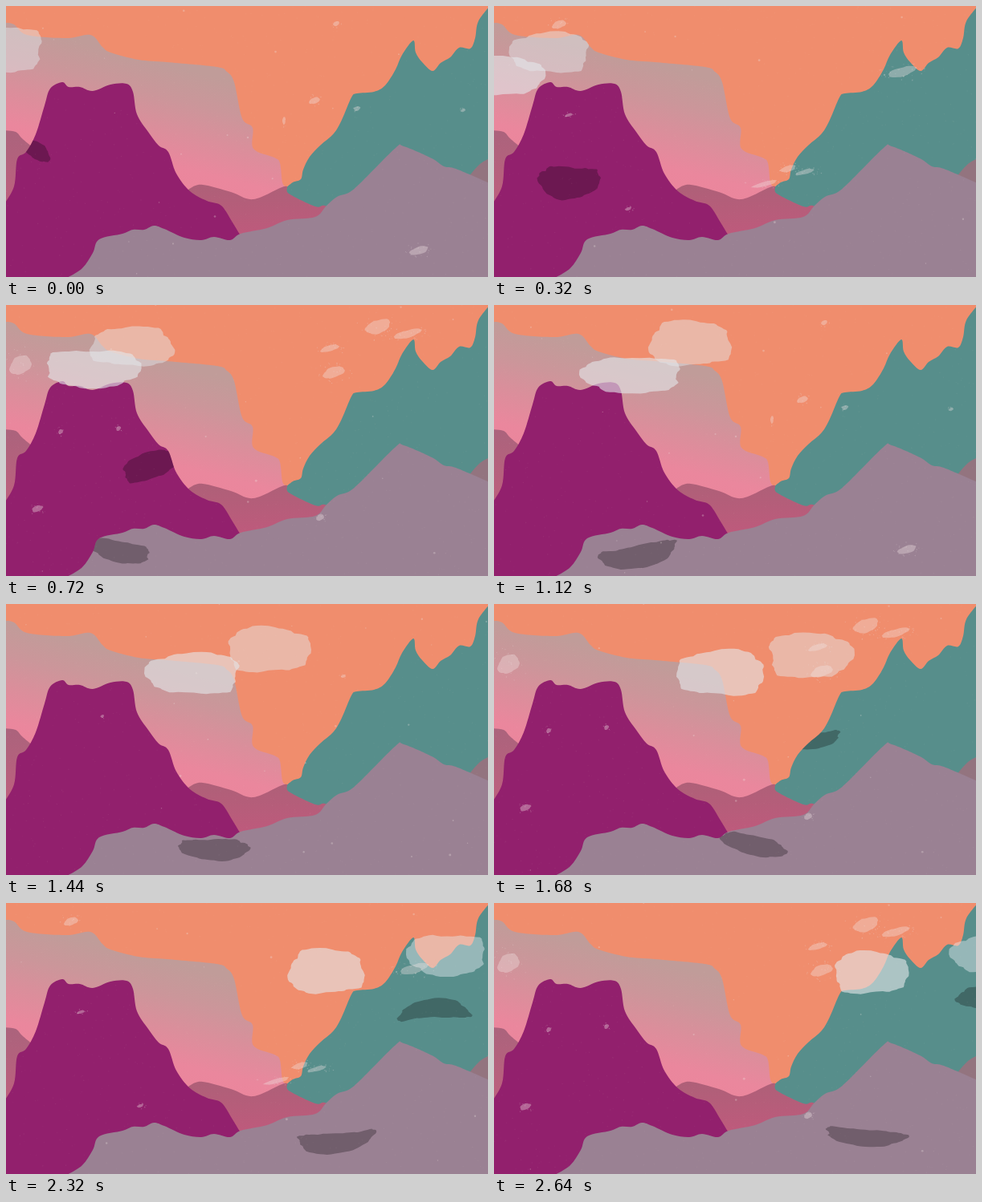
Write an HTML page with a canvas that moves like this. It is 600 by 338 pixels and loops after 2.72 s.

```html
<!DOCTYPE html>
<html lang="en">
<head>
<meta charset="utf-8">
<title>Drifting clouds</title>
<style>
html, body { margin: 0; width: 100%; height: 100%; overflow: hidden; background: #f08d6d; }
canvas { display: block; width: 600px; height: 338px; }
</style>
</head>
<body>
<canvas id="stage" width="600" height="338"></canvas>
<script>
const W = 600, H = 338, LOOP = 2720, TICK = 40, TAU = 2 * Math.PI;
const ctx = document.getElementById('stage').getContext('2d');

const parse = s => s.trim().split(/\s+/).map(p => p.split(',').map(Number));

function seeded(seed) {
  return () => {
    seed = (seed * 1664525 + 1013904223) >>> 0;
    return seed / 4294967296;
  };
}

// A smooth ridge through the points (Catmull-Rom), closed down to the bottom
function ridge(s) {
  const pts = parse(s), end = pts.length - 1, path = new Path2D();
  const at = i => pts[Math.max(0, Math.min(end, i))];
  path.moveTo(...pts[0]);
  for (let i = 0; i < end; i++) {
    const [a, b, c, d] = [at(i - 1), at(i), at(i + 1), at(i + 2)];
    path.bezierCurveTo(
      b[0] + (c[0] - a[0]) / 6, b[1] + (c[1] - a[1]) / 6,
      c[0] - (d[0] - b[0]) / 6, c[1] - (d[1] - b[1]) / 6, ...c);
  }
  path.lineTo(pts[end][0], H + 4);
  path.lineTo(pts[0][0], H + 4);
  path.closePath();
  return path;
}

const land = {
  mesa: ridge(`-4,21 10,23 26,36 75,40 105,36 120,51 130,58 165,67 200,70 262,76 275,82
    284,95 294,140 307,152 308,178 334,189 341,196 344,220 349,226`),
  leftHill: ridge('-4,155 12,157 22,167 50,190'),
  teal: ridge(`347,228 357,220 367,216 370,204 378,188 391,174 408,159 418,142 430,114 437,109 458,107
    472,99 485,79 493,61 507,43 510,58 518,70 531,81 541,71 553,64 564,52 578,53 584,40 588,19 604,-2`),
  rose: ridge('222,234 230,227 245,223 280,232 308,241 347,225 352,234 385,250 397,249 420,260'),
  rightHill: ridge('574,215 590,197 604,189'),
  purple: ridge(`-4,250 10,225 14,191 25,182 37,160 48,124 55,103 70,95 78,101 92,101 108,106 130,98 150,97
    158,107 163,135 177,157 190,174 202,182 212,209 229,231 250,243 268,249 282,270 300,300`),
  lilac: ridge(`76,339 95,327 108,308 116,291 145,284 158,279 172,279 184,274 197,278 222,289 243,292
    259,288 279,292 292,284 325,277 350,267 385,263 398,250 412,238 428,232 445,217 485,177
    495,175 530,190 545,200 560,203 604,222`)
};
const rock = new Path2D(land.purple);
rock.addPath(land.teal);

// Rows: step, x, y, half width, half height, bend, tilt
const backCloud = parse(`0,-2,54,49,29 5,70,58,50,26 12,157,52,53,25 19,244,48,52,29
  28,393,64,53,29 35,494,65,51,28 44,617,64,48,24`);
const frontCloud = parse('5,11,87,51,25 12,108,79,60,24 19,172,87,63,23 28,283,86,56,29 35,342,84,49,30 44,469,87,47,27');
const rockShadow = parse(`0,39,181,16,12,0,7 5,93,218,40,21,-10,0 12,180,200,36,18,0,-10 28,397,169,36,10,-6,-4
  35,469,148,52,11,17,-4 44,614,118,40,14,0,0`);
const valeShadow = parse(`5,49,306,41,14,-3,8 12,140,306,41,14,-3,8 19,180,311,50,15,-9,-9 28,323,300,42,13,-4,9
  35,368,301,48,15,-14,-11 44,462,291,52,11,-5,4`);

// Blend neighbouring rows; the first slope carries on backwards
function pose(rows, step) {
  let i = 0;
  while (i < rows.length - 2 && step >= rows[i + 1][0]) i++;
  const a = rows[i], b = rows[i + 1], u = (step - a[0]) / (b[0] - a[0]);
  return a.map((v, j) => v + (b[j] - v) * u).slice(1);
}

// A torn-paper blob: rounded box with slowly turning lumps and a ragged rim
function blob([x, y, rx, ry, bend = 0, tilt = 0], turn, boxy = .75, n = 72) {
  const path = new Path2D(), soft = v => Math.sign(v) * Math.abs(v) ** boxy;
  for (let i = 0; i < n; i++) {
    const a = i / n * TAU;
    const r = .96 + .05 * Math.sin(3 * a + turn) + .04 * Math.sin(5 * a - 2 * turn)
      + .025 * Math.sin(11 * a + turn) + .012 * Math.sin(23 * a);
    const u = r * soft(Math.cos(a)), v = r * soft(Math.sin(a));
    path.lineTo(x + rx * u, y + ry * v + bend * (u * u - .4) + tilt * u);
  }
  path.closePath();
  return path;
}

function sheet(draw) {
  const c = document.createElement('canvas');
  c.width = W;
  c.height = H;
  draw(c.getContext('2d'));
  return c;
}

function fill(g, path, color) {
  g.fillStyle = color;
  g.fill(path);
}

function scatter(g, rnd, n, x, y, rx, ry, size, color) {
  g.fillStyle = color;
  while (n--) {
    const a = rnd() * TAU, d = Math.sqrt(rnd());
    g.beginPath();
    g.arc(x + rx * d * Math.cos(a), y + ry * d * Math.sin(a), size * (.4 + .6 * rnd()), 0, TAU);
    g.fill();
  }
}

// Worn spots of each paper: x, y, half width, half height
const wear = [
  '411,22,4,3 384,118,7,4 346,143,2,5 437,128,4,3 569,130,3,2 514,305,12,5',
  '81,23,9,5 387,207,12,3 366,203,10,4 337,222,16,3 508,82,18,6 93,136,5,2 167,253,4,2',
  '120,140,2,2 420,90,3,2',
  '18,75,14,12 463,27,16,9 500,36,18,5 403,54,12,4 408,84,14,7 391,265,5,4 39,254,7,4 140,154,3,3 68,158,3,3'
];
const papers = wear.map((spots, i) => sheet(g => {
  const rnd = seeded(17 + i * 101);
  scatter(g, rnd, 1500, 300, 169, 400, 240, .8, 'rgba(255,235,225,.06)');
  scatter(g, rnd, 25, 300, 169, 400, 240, 1.5, 'rgba(240,228,226,.3)');
  for (const [x, y, rx, ry] of parse(spots)) {
    fill(g, blob([x, y, rx, ry, 0, -rx / 4], rnd() * TAU, 1, 30), 'rgba(240,228,226,.36)');
    scatter(g, rnd, rx * 2, x, y, rx * 1.8, ry * 2, .8, 'rgba(240,228,226,.25)');
  }
}));

function gradient(x0, y0, x1, y1, ...stops) {
  const g = ctx.createLinearGradient(x0, y0, x1, y1);
  stops.forEach((c, i) => g.addColorStop(i / (stops.length - 1), c));
  return g;
}

const backdrop = sheet(g => {
  g.fillStyle = '#f08d6d';
  g.fillRect(0, 0, W, H);
  fill(g, land.mesa, gradient(150, 60, 110, 215, '#c09c99', '#cb969a', '#db8e9b', '#ea879d', '#ec859c'));
  fill(g, land.leftHill, gradient(0, 155, 0, 245, '#ab637c', '#bd607e'));
  fill(g, land.teal, '#578e8b');
  fill(g, land.rose, gradient(0, 223, 0, 285, '#ae6078', '#be5a7c'));
  fill(g, land.rightHill, '#93747f');
  fill(g, land.purple, '#92206d');
});

function shade(area, path) {
  ctx.save();
  ctx.clip(area);
  fill(ctx, path, 'rgba(8,4,10,.28)');
  ctx.restore();
}

function render(time) {
  const tick = Math.floor(time % LOOP / TICK);
  // Four steps share every six ticks; the first and last last two
  const step = Math.floor(tick / 6) * 4 + Math.max(0, Math.min(3, tick % 6 - 1));
  const turn = step * .15;
  ctx.drawImage(backdrop, 0, 0);
  shade(rock, blob(pose(rockShadow, step), turn, .9));
  fill(ctx, land.lilac, '#9a8193');
  shade(land.lilac, blob(pose(valeShadow, step), turn + 2, .9));
  fill(ctx, blob(pose(backCloud, step), turn + 4), 'rgba(226,232,238,.45)');
  fill(ctx, blob(pose(frontCloud, step), turn + 1), 'rgba(228,232,236,.6)');
  ctx.drawImage(papers[Math.floor(step / 4) % 4], 0, 0);
}

const start = performance.now();
function loop() {
  render(performance.now() - start);
  requestAnimationFrame(loop);
}
loop();
</script>
</body>
</html>
```
